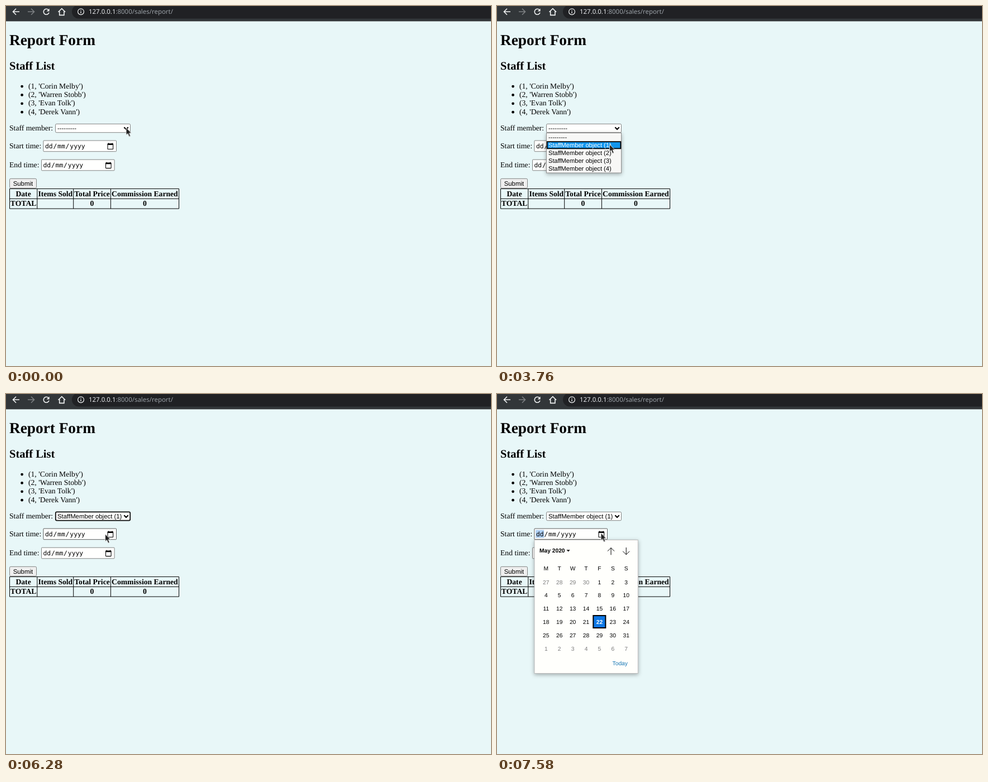
These frames come from a looping animation (868x645 px, 8000 ms). An HTML page:

```html
<!DOCTYPE html>
<html lang="en">
<head>
<meta charset="utf-8">
<title>Report Form</title>
<style>
  html, body { margin: 0; width: 100%; height: 100%; overflow: hidden; background: #e8f7f8; }
  svg { display: block; width: 868px; height: 645px; text-rendering: geometricPrecision; }
  .serif { font: 13.65px "Liberation Serif", "Times New Roman", serif; }
  .sans { font: 11.37px "Liberation Sans", Arial, sans-serif; }
  .mono { font: 11.37px "DejaVu Sans Mono", monospace; }
  .url { font: 11.45px "Noto Sans", sans-serif; }
  .bold { font-weight: bold; }
  .mid { text-anchor: middle; }
  .line { fill: none; stroke: #000; }
  .field { fill: #fffffe; stroke: #767676; stroke-width: .9; }
  .ring { fill: none; stroke: #101010; stroke-width: 1.8; }
  .popup { filter: drop-shadow(0 2px 3.5px rgba(0, 0, 0, .32)); }
  .calendar { font-size: 10.24px; }

  .anim { animation: 8s step-end infinite; }
  #cursor { animation-name: cursor; }
  #blank { animation-name: blank; }
  #chosen { animation-name: chosen; }
  #selectRing { animation-name: selectRing; }
  #options { animation-name: options; }
  #bar { animation-name: bar; }
  #option0 { animation-name: option0; }
  #option1 { animation-name: option1; }
  #startField { animation-name: hover; }
  #dateRing { animation-name: dateRing; }
  #dayMark { animation-name: dayMark; }
  #loading { animation-name: loading; }
  #calendar { animation-name: calendar; }

  @keyframes cursor {
    0% { transform: translate(214.5px, 217.5px); }
    35.25% { transform: translate(214.5px, 218.5px); }
    40% { transform: translate(210.5px, 228px); }
    43.5% { transform: translate(206.5px, 243px); }
    47% { transform: translate(201px, 247.5px); }
    75% { transform: translate(199px, 248.5px); }
    75.5% { transform: translate(197px, 249.5px); }
    78.5% { transform: translate(177px, 250.5px); }
    85.5% { transform: translate(179.5px, 250.5px); }
    89% { transform: translate(185.5px, 248.5px); }
  }
  @keyframes blank { 0% { opacity: 1; } 68.25%, 100% { opacity: 0; } }
  @keyframes chosen { 0% { opacity: 0; } 68.25%, 100% { opacity: 1; } }
  @keyframes selectRing { 0% { opacity: 0; } 68.25% { opacity: 1; } 91%, 100% { opacity: 0; } }
  @keyframes options { 0% { opacity: 0; } 15.5% { opacity: 1; } 68.25%, 100% { opacity: 0; } }
  @keyframes bar { 0% { transform: none; } 43.5%, 100% { transform: translateY(14.05px); } }
  @keyframes option0 { 0% { fill: #fff; } 43.5%, 100% { fill: #000; } }
  @keyframes option1 { 0% { fill: #000; } 43.5%, 100% { fill: #fff; } }
  @keyframes hover { 0% { stroke: #767676; } 75%, 100% { stroke: #4f4f4f; } }
  @keyframes dateRing { 0% { opacity: 0; } 91% { opacity: 1; } 94.25%, 100% { opacity: 0; } }
  @keyframes dayMark { 0% { opacity: 0; } 91%, 100% { opacity: 1; } }
  @keyframes loading { 0% { opacity: 0; } 94.25% { opacity: 1; } 94.75%, 100% { opacity: 0; } }
  @keyframes calendar { 0% { opacity: 0; } 94.75%, 100% { opacity: 1; } }
</style>
</head>
<body>
<svg viewBox="0 0 868 645">
  <defs>
    <g id="dateText" class="mono">
      <text x="3.4" y="14">dd</text><text x="17.9" y="14">/</text>
      <text x="25.6" y="14">mm</text><text x="40.1" y="14">/</text>
      <text x="47.8" y="14">yyyy</text>
      <path transform="translate(113.9 4.1) scale(.533)" d="M20 3h-1V1h-2v2H7V1H5v2H4c-1.1 0-2 .9-2 2v16c0 1.1.9 2 2 2h16c1.1 0 2-.9 2-2V5c0-1.1-.9-2-2-2zm0 18H4V8h16v13z"/>
    </g>
  </defs>
  <rect width="868" height="645" fill="#e8f7f8"/>

  <!-- Browser toolbar -->
  <rect width="868" height="27.4" fill="#323639"/>
  <rect x="118" y="-2" width="780" height="24.5" rx="12.2" fill="#202124"/>
  <g fill="none" stroke="#f1f3f4" stroke-width="1.6">
    <path d="M24 10.3H13M18 4.8 12.5 10.3 18 15.8"/>
    <path d="M39 10.3H50M45 4.8 50.5 10.3 45 15.8" stroke="#7d8083"/>
    <path d="M76 7A5 5 0 1 0 77 11.8"/>
    <path d="M77.6 4.4V9.4H72.6Z" fill="#f1f3f4" stroke="none"/>
    <path d="M93.5 10.8 99.8 4.6 106.1 10.8M95.7 9.5V16.4H103.9V9.5"/>
    <circle cx="134" cy="10.2" r="5.4" stroke-width="1.2"/>
    <path d="M134 9.5V13.2M134 7V8.3" stroke-width="1.3"/>
  </g>
  <text class="url" x="148" y="14.4" fill="#e8eaed">127.0.0.1<tspan fill="#9aa0a6">:8000/sales/report/</tspan></text>

  <!-- Page -->
  <g class="serif">
    <text class="bold" x="6" y="69.9" style="font-size:27.3px">Report Form</text>
    <text class="bold" x="6" y="113.8" style="font-size:20.48px">Staff List</text>
    <g id="staff"></g>
    <text x="6" y="222.8">Staff member:</text>
    <text x="6" y="254.9">Start time:</text>
    <text x="6" y="289.1">End time:</text>
  </g>

  <rect class="field" x="88.5" y="211.3" width="134" height="15.4" rx="2"/>
  <g class="sans">
    <text id="blank" class="anim" x="92" y="223">---------</text>
    <text id="chosen" class="anim" x="92" y="223">StaffMember object (1)</text>
  </g>
  <path class="line" d="M211.3 217.2 215 221 218.7 217.2" stroke-width="2"/>
  <rect id="selectRing" class="ring anim" x="88.8" y="211.4" width="133.4" height="15.2" rx="2"/>

  <rect id="startField" class="field anim" x="66.9" y="241.1" width="130.6" height="19.6" rx="1"/>
  <rect id="dayMark" class="anim" x="69.2" y="243.6" width="15" height="14" fill="#aed0f5"/>
  <use href="#dateText" x="66.5" y="240.6"/>
  <rect id="dateRing" class="ring anim" x="67.2" y="241.2" width="130" height="19.4" rx="1.5"/>

  <rect class="field" x="63.5" y="275.2" width="130.6" height="19.6" rx="1"/>
  <use href="#dateText" x="63" y="274.8"/>

  <rect class="field" x="6.5" y="309.3" width="48" height="17" rx="2" style="fill:#efefef"/>
  <text class="sans mid" x="30.4" y="322">Submit</text>

  <path class="line" d="M6.5 327.4H309.5V363.1H6.5ZM6.5 345.3H309.5M55.8 327.4V363.1M120.7 327.4V363.1M187.4 327.4V363.1"/>
  <g id="table" class="serif bold mid"></g>

  <!-- Option list -->
  <g id="options" class="sans anim" style="font-size:11.1px">
    <rect class="popup" x="88.5" y="227.5" width="134" height="71.5" fill="#f7f7f6" stroke="#8e8e8e"/>
    <rect id="bar" class="anim" x="89.7" y="229.1" width="131.6" height="12.2" fill="#1296ee" stroke="#000" stroke-width="1.8"/>
  </g>

  <!-- Date picker -->
  <rect id="loading" class="popup anim" x="66.5" y="261" width="186" height="239.7" fill="#323230"/>
  <g id="calendar" class="sans calendar anim">
    <rect class="popup" x="67" y="261.5" width="185.3" height="239" fill="#fffffc" stroke="#bcbcbc"/>
    <text class="bold" x="76" y="284.2">May 2020</text>
    <path d="M124.5 279.2H130.7L127.6 282.4Z"/>
    <path class="line" d="M204 288.3V275.6M198 281.6 204 275.6 210 281.6M231.2 275V287.7M225.2 281.7 231.2 287.7 237.2 281.7"/>
    <rect x="172.3" y="397" width="22" height="22" fill="#0f78e6" stroke="#000" stroke-width="2"/>
    <g id="days" class="mid"></g>
    <text x="206.6" y="486.4" fill="#1576b5">Today</text>
  </g>

  <path id="cursor" class="anim" d="M.5 .5V13.8L3.5 11 5.8 16.6 8.3 15.5 6 10.2H10Z" fill="#202020" stroke="#fff" stroke-width=".8"/>
</svg>
<script>
  const byId = id => document.getElementById(id);

  function add(parent, tag, attrs, content = "") {
    const node = document.createElementNS("http://www.w3.org/2000/svg", tag);
    for (const key in attrs) node.setAttribute(key, attrs[key]);
    node.textContent = content;
    byId(parent).append(node);
  }

  ["Corin Melby", "Warren Stobb", "Evan Tolk", "Derek Vann"].forEach((name, i) => {
    const y = 147.6 + 15.36 * i;
    add("staff", "circle", { cx: 28.6, cy: y - 3.5, r: 2.4 });
    add("staff", "text", { x: 40, y }, `(${i + 1}, '${name}')`);
  });

  const columns = [31.1, 88.3, 154, 248.4];
  const rows = [["Date", "Items Sold", "Total Price", "Commission Earned"], ["TOTAL", "", "0", "0"]];
  rows.forEach((row, r) => row.forEach((label, c) =>
    add("table", "text", { x: columns[c], y: 340.5 + 17.9 * r }, label)));

  for (let i = 0; i < 5; i++) {
    add("options", "text", { id: "option" + i, class: i < 2 ? "anim" : "", x: 92, y: 238.7 + 14.05 * i },
      i ? `StaffMember object (${i})` : "---------");
  }

  const dayX = i => 87.8 + 23.9 * i;
  [..."MTWTFSS"].forEach((letter, i) => add("days", "text", { x: dayX(i), y: 315.7 }, letter));
  for (let i = 0; i < 42; i++) {
    const date = new Date(2020, 3, 27 + i), day = date.getDate(), inMonth = date.getMonth() === 4;
    const today = inMonth && day === 22;
    add("days", "text", {
      x: dayX(i % 7), y: 340.5 + 23.9 * Math.floor(i / 7),
      class: today ? "bold" : "", fill: today ? "#fff" : inMonth ? "#000" : "#7c7c7c"
    }, day);
  }
</script>
</body>
</html>
```
